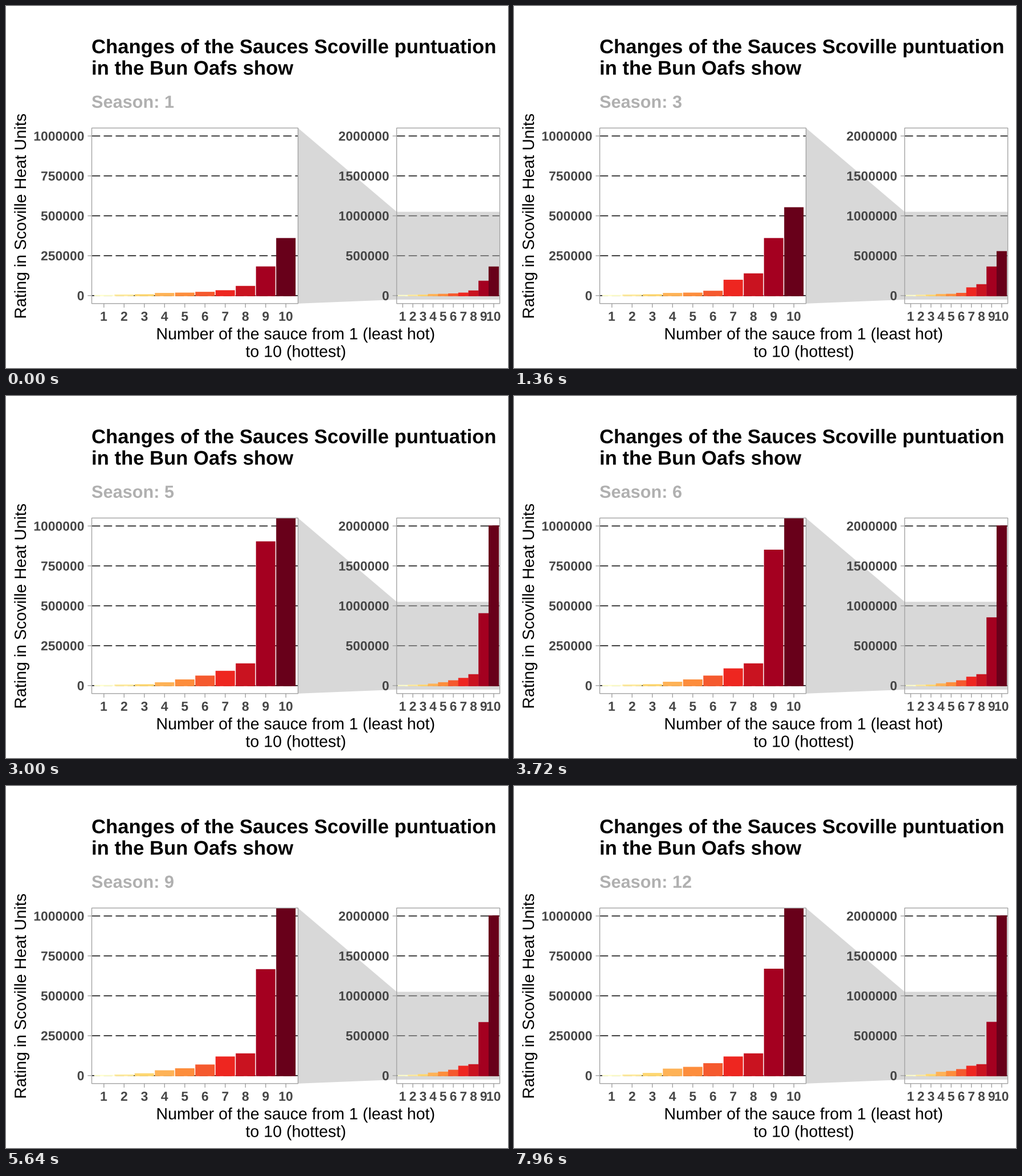
These frames come from a looping animation (881x636 px, 8000 ms). A matplotlib script:

```python
import numpy as np
import matplotlib.pyplot as plt
from matplotlib.animation import FuncAnimation
from matplotlib.colors import LinearSegmentedColormap
from matplotlib.patches import PathPatch, Polygon, Rectangle
from matplotlib.textpath import TextPath
from matplotlib.transforms import Affine2D

W, H, DPI = 881, 636, 64
FRAMES, STEP_MS = 200, 40
SEASONS_PER_FRAME = 14 / 250
SAUCES = 10

TOP, BOTTOM, ZERO, GRID_GAP = 214.4, 522.8, 508.8, 70.1
LEFT = dict(x=150.5, w=362, step=250_000)
RIGHT = dict(x=685.6, w=181, step=500_000)
EDGE = 1.05  # half of the outline around each bar
LINE, LABEL, SEASON_GREY = "#a3a3a3", "#464646", "#b0b0b0"

HEAT_MAP = LinearSegmentedColormap.from_list("heat", [
    (0, "#ffffcc"), (2 / 9, "#fed770"), (4 / 9, "#fd8d3c"),
    (6 / 9, "#ee2620"), (8 / 9, "#a50020"), (1, "#68001a")])

fig = plt.figure(figsize=(W / DPI, H / DPI), dpi=DPI, facecolor="white")
ax = fig.add_axes([0, 0, 1, 1])
ax.set(xlim=(0, W), ylim=(H, 0))
ax.axis("off")


def heat_units(t):
    """Heat of all sauces, mild to hot, at season t."""
    def rise(start, end, amount):
        return amount * np.clip((t - start) / (end - start), 0, 1)

    spicier, late = rise(4, 5, 1), rise(8, 10, 1)
    thousands = [
        0.7,
        3.5,
        5 + rise(6, 10, 8),
        13 + rise(4, 12, 27),
        15 + 20 * spicier + 16 * late,
        20 + rise(1, 3, 7) + 32 * spicier + 15 * late,
        30 + rise(1, 3, 69) - 13 * spicier + rise(5, 7, 30),
        57 + rise(1, 2, 78.6),
        179 + rise(1, 2, 178) + rise(3, 4, 217) + 326 * spicier
        - rise(6, 7, 250) + rise(7, 11, 28) - rise(11, 12, 12),
        357 + rise(1, 2, 193) + rise(3, 4, 1450),
    ]
    return [1000 * v for v in thousands]


def px(width):
    return width * 72 / DPI


def text_path(s, x, y, size, bold=False, align=0, angle=0):
    font = dict(family="Liberation Sans", weight="bold" if bold else "normal")
    path = TextPath((0, 0), s, size=size, prop=font)
    box = path.get_extents()
    shift = -(box.x0 + align * box.width) if align else 0
    move = Affine2D().translate(shift, 0).scale(1, -1)
    return path.transformed(move.rotate_deg(-angle).translate(x, y))


def write(s, x, y, size, color="black", **kw):
    patch = PathPatch(text_path(s, x, y, size, **kw), fc=color, lw=0, zorder=6)
    return ax.add_patch(patch)


def line(x0, y0, x1, y1, color, width, z, style="-"):
    ax.plot([x0, x1], [y0, y1], color=color, lw=px(width), ls=style,
            zorder=z, snap=False, solid_capstyle="butt",
            dash_capstyle="butt")


def make_panel(p):
    x, w = p["x"], p["w"]
    ax.add_patch(Rectangle((x, TOP), w, BOTTOM - TOP, fill=False, ec=LINE,
                           lw=px(1.4), zorder=5, snap=False))
    for k in range(5):
        y = ZERO - k * GRID_GAP
        line(x, y, x + w, y, "black", 1.5, 2, (0, (9.8, 4.2)))
        line(x - 7.1, y, x, y, LINE, 1.4, 5)
        write(str(k * p["step"]), x - 14, y + 8.1, 22.9, LABEL,
              bold=True, align=1)
    unit = w / (SAUCES + 0.2)
    half = 0.45 * unit + EDGE
    bars = []
    for n in range(SAUCES):
        cx = x + unit * (n + 0.6)
        line(cx, BOTTOM, cx, BOTTOM + 7.1, LINE, 1.4, 5)
        write(str(n + 1), cx, 553, 22.9, LABEL, bold=True, align=0.5)
        bar = Rectangle((cx - half, ZERO), 2 * half, 1, lw=0, zorder=4,
                        fc=HEAT_MAP(n / (SAUCES - 1)), snap=False)
        ax.add_patch(bar)
        bar.set_clip_path(Rectangle((x, TOP), w, BOTTOM - TOP,
                                    transform=ax.transData))
        bars.append(bar)
    return bars, GRID_GAP / p["step"]


# Zoom region: wedge between the panels and band over the right grid
zoom_top, zoom_bottom = ZERO - 2.1 * GRID_GAP, ZERO + 0.1 * GRID_GAP
x0, x1 = LEFT["x"] + LEFT["w"], RIGHT["x"]
shade = dict(fc="#b3b3b3", alpha=0.5, lw=0, snap=False)
ax.add_patch(Polygon([(x0, TOP), (x1, zoom_top), (x1, zoom_bottom),
                      (x0, BOTTOM)], zorder=1, **shade))
ax.add_patch(Rectangle((x1, zoom_top), RIGHT["w"], zoom_bottom - zoom_top,
                       zorder=3, **shade))

panels = [make_panel(LEFT), make_panel(RIGHT)]

write("Changes of the Sauces Scoville puntuation", 150, 83, 34.65, bold=True)
write("in the Bun Oafs show", 150, 120.6, 34.65, bold=True)
write("Number of the sauce from 1 (least hot)", 508.5, 585.6, 28.6, align=0.5)
write("to 10 (hottest)", 508, 616.6, 28.6, align=0.5)
write("Rating in Scoville Heat Units", 35, 368.6, 28.6, align=0.5, angle=90)
season_text = write("Season: 1", 150, 178.8, 30.7, SEASON_GREY, bold=True)


def draw(i):
    t = 1 + i * SEASONS_PER_FRAME
    heat = heat_units(t)
    for bars, scale in panels:
        for bar, value in zip(bars, heat):
            bar.set_y(ZERO - value * scale - EDGE)
            bar.set_height(value * scale + 2 * EDGE)
    label = f"Season: {int(t + 0.5)}"
    season_text.set_path(text_path(label, 150, 178.8, 30.7, bold=True))
    return []


anim = FuncAnimation(fig, draw, frames=FRAMES, interval=STEP_MS,
                     init_func=lambda: draw(0), repeat=True, repeat_delay=0)
plt.show()
```
